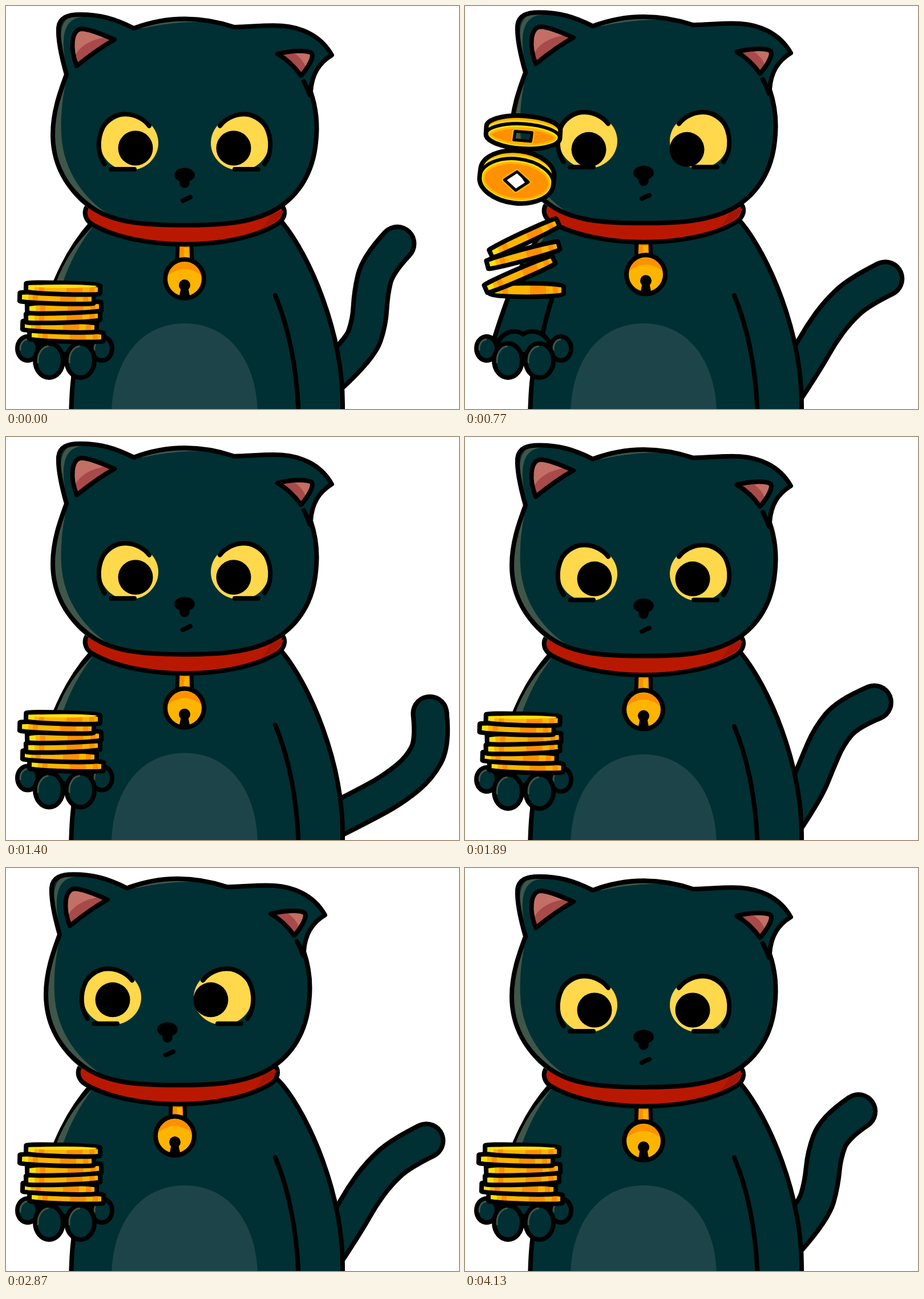
Animation of 794 by 706 pixels, one loop 4200 ms. Source, as an HTML page with a canvas:

```html
<!DOCTYPE html>
<html lang="en">
<head>
<meta charset="utf-8">
<title>Cat tossing coins</title>
<style>
html, body { margin: 0; width: 100%; height: 100%; overflow: hidden; background: #fff; }
canvas { display: block; }
</style>
</head>
<body>
<canvas id="stage" width="794" height="706"></canvas>
<script>
const c = document.getElementById('stage').getContext('2d');
const LOOP = 4200, STEP = 70, TAU = 2 * Math.PI;
const FUR = '#003033', SHINE = '#3f564a', BELLY = '#1d4549', RED = '#b91800';
const AMBER = '#ffb400', ORANGE = '#ff9000', YELLOW = '#ffdf10';
const PINK = '#c26f66', DARK_PINK = '#a84a4a';

const P = d => new Path2D(d);
const shape = {
  body: P('M165 362L150 380C110 425 85 475 52 580L60 610L120 610L118 652Q115 675 114 720H590V706C592 570 530 435 485 380L468 362Z'),
  shoulder: P('M153 386Q110 425 87 486L99 486Q118 430 153 386Z'),
  forearm: P('M152 514Q142 545 136 576'),
  arm: P('M472 507C494 560 510 630 513 720'),
  belly: P('M185 712C187 622 235 556 313 556C391 556 439 622 441 712Z'),
  collar: P('M150 346C136 350 133 372 152 383C232 429 396 429 474 383C493 372 492 350 476 346Z'),
  collarShade: P('M487 358Q480 376 448 390Q460 376 464 364Z'),
  head: P('M106 120C96 85 91 55 92 38C94 20 108 15 130 15C165 15 190 22 224 39C280 18 340 17 400 37C450 36 490 27 530 47C548 56 562 70 571 86C548 100 536 120 534 150C546 185 546 215 543 240C538 290 515 330 475 355C430 382 370 384 313 384C240 384 180 380 140 345C100 312 82 270 82 225C82 185 95 150 106 120Z'),
  headShine: P('M106 122C82 170 74 250 100 305C125 345 150 365 192 372C140 345 100 290 97 225C95 170 104 145 106 122ZM108 118C88 55 92 14 130 16C175 14 200 25 222 38C195 24 170 19 140 19C97 18 95 60 108 118ZM225 38Q300 14 375 28Q300 25 240 39Z'),
  earFold: P('M522 132Q528 143 533 157'),
  earL: P('M190 59C165 48 145 40 132 40C114 42 112 75 124 105C140 92 165 73 190 59Z'),
  earLShade: P('M118 92Q132 60 180 54L190 59L124 105Z'),
  earR: P('M476 84C500 78 525 77 535 82C542 88 528 110 517 122C505 105 492 93 476 84Z'),
  earRLight: P('M503 81Q520 92 526 108Q540 90 535 82Z'),
  eyeRim: P('M251 210C233 186 189 179 170 212C158 236 162 262 173 277'),
  eyeLid: P('M184 286H225'),
  mouth: P('M310 341L323 335'),
  palm: P('M56 610C52 575 84 562 102 575C120 562 152 575 152 610Z'),
  strap: P('M301 416H325L326 446H300Z'),
  bellBand: P('M280 475Q313 446 346 475A34 34 0 0 0 280 475Z'),
  clapper: P('M309 490H317L321 510H305Z')
};

function paint(path, fill, width = 8) {
  if (fill) { c.fillStyle = fill; c.fill(path); }
  if (width) { c.lineWidth = width; c.strokeStyle = '#000'; c.stroke(path); }
}
function oval(x, y, rx, ry, fill, width = 0) {
  const p = new Path2D();
  p.ellipse(x, y, rx, ry, 0, 0, TAU);
  paint(p, fill, width);
}
function at(x, y, draw) {
  c.save();
  c.translate(x, y);
  draw();
  c.restore();
}

const clamp = k => Math.max(0, Math.min(1, k));
// Eased step from 0 to 1 between times a and b
function ramp(t, a, b) {
  const k = clamp((t - a) / (b - a));
  return k * k * (3 - 2 * k);
}
// Rises over a..b, falls over d..e
const hold = (t, a, b, d, e) => ramp(t, a, b) - ramp(t, d, e);
const hump = (t, a, b) => Math.sin(Math.PI * clamp((t - a) / (b - a))) ** 2;
const wave = (t, period) => (1 - Math.cos(TAU * t / period)) / 2;

const TOSS_TOP = 560, TOSS_HALF = 325;

function pose(t) {
  const left = hold(t, 2300, 2700, 2950, 3400);
  const right = hold(t, 2950, 3400, 3600, 3990);
  const up = hold(t, 200, 500, 560, 770);
  const down = hold(t, 560, 770, 900, 1100);
  return {
    headX: 7 * right - 12 * left,
    headY: -4.4 * wave(t, 2100),
    faceX: -18 * left,
    faceY: -9.5 * left,
    gazeX: 9 * right - 10 * left - 12 * up - 10 * down,
    gazeY: 6 * down - 15 * up - 5 * (left + right),
    bell: 5 * right - 5 * left + 4 * down,
    bodyY: -2.5 * hump(t, 1190, 1610),
    handY: 10 * hump(t, 0, 235) + 10 * hump(t, 885, 1100) - 2.5 * hump(t, 1190, 1610),
    lift: Math.max(0, 1 - ((t - TOSS_TOP) / TOSS_HALF) ** 2),
    wobble: wave(t, 1400)
  };
}

// A chain of joints from root to tip, each swinging later than the one before
const tailSwing = [16, 23, 31, 23, 37], tailLag = [-86, -31, -2, 38, 110];

function drawTail(t) {
  const turn = TAU * t / 1050;
  let x = 565, y = 665 - 13 * Math.cos(2 * turn) + 6 * Math.sin(turn);
  const joints = [[x, y]];
  tailSwing.forEach((swing, i) => {
    const degrees = 61 - 20 * 0.5 ** i + swing * Math.cos(turn - tailLag[i] * TAU / 360);
    const angle = degrees * TAU / 360;
    const length = i ? 51 : 74 + 13 * Math.sin(turn);
    x += length * Math.cos(angle);
    y -= length * Math.sin(angle);
    joints.push([x, y]);
  });
  const p = new Path2D();
  p.moveTo(...joints[0]);
  for (let i = 1; i < 5; i++) {
    const [ax, ay] = joints[i], [bx, by] = joints[i + 1];
    const end = i === 4 ? 1 : 0.5;
    p.quadraticCurveTo(ax, ay, ax + (bx - ax) * end, ay + (by - ay) * end);
  }
  c.lineCap = 'butt';
  for (const [color, width] of [['#000', 67], [FUR, 51]]) {
    c.strokeStyle = color;
    c.lineWidth = width;
    c.stroke(p);
    oval(x, y, width / 2, width / 2, color);
  }
  c.lineCap = 'round';
}

function drawBody() {
  paint(shape.body, FUR);
  paint(shape.shoulder, SHINE, 0);
  paint(shape.belly, BELLY, 0);
  paint(shape.arm);
  paint(shape.forearm);
}

function drawBell(dx) {
  paint(shape.strap, ORANGE, 7);
  c.fillStyle = AMBER;
  c.fillRect(312, 424, 8, 18);
  at(dx, -Math.abs(dx), () => {
    oval(313, 478, 34, 34, AMBER);
    paint(shape.bellBand, ORANGE, 0);
    oval(313, 478, 34, 34, null, 8);
    oval(313, 489, 10, 10, '#000');
    paint(shape.clapper, '#000', 3);
  });
}

function drawEye(gx, gy, mirror) {
  c.save();
  if (mirror) { c.translate(626, 0); c.scale(-1, 1); }
  oval(216, 240, 51, 48, '#ffd84c');
  paint(shape.eyeRim);
  paint(shape.eyeLid);
  oval(227 + (mirror ? -gx : gx), 249 + gy, 30.5, 30.5, '#000');
  c.restore();
}

function drawHead(now) {
  paint(shape.collar, RED);
  paint(shape.collarShade, '#a31505', 0);
  paint(shape.head, FUR, 0);
  paint(shape.headShine, SHINE, 0);
  paint(shape.head);
  paint(shape.earFold);
  paint(shape.earL, PINK, 0);
  paint(shape.earLShade, DARK_PINK, 0);
  paint(shape.earL);
  paint(shape.earR, DARK_PINK, 0);
  paint(shape.earRLight, PINK, 0);
  paint(shape.earR);
  at(now.faceX, now.faceY, () => {
    drawEye(now.gazeX, now.gazeY, false);
    drawEye(now.gazeX, now.gazeY, true);
    oval(313, 296, 18, 12.5, '#000');
    oval(313, 309, 9, 10, '#000');
    paint(shape.mouth);
  });
}

function drawToe(x, y, rx, ry) {
  oval(x, y, rx, ry, FUR, 8);
  c.strokeStyle = SHINE;
  c.lineWidth = 3;
  c.beginPath();
  c.ellipse(x, y, rx - 5, ry - 5, 0, 3, 4.6);
  c.stroke();
}
function drawHand() {
  paint(shape.palm, FUR);
  for (const side of [-1, 1]) drawToe(103 + 65 * side, 600, 18, 21);
  for (const side of [-1, 1]) drawToe(103 + 27.5 * side, 621, 24.5, 30);
}

function holePath(open, y) {
  const p = new Path2D(), spin = Math.max(0, open - .32) * 2.7;
  for (let i = 0; i < 4; i++) {
    const a = spin + TAU * (i / 4 + 1 / 8);
    p.lineTo(21 * Math.cos(a), y + 21 * Math.sin(a) * (open + .18));
  }
  p.closePath();
  return p;
}

// open: 0 is edge-on, 1 is face-on
function drawCoin(x, y, tilt, open) {
  const rx = 65, ry = rx * open, h = 7, showFace = open > .14;
  const rim = new Path2D(), face = new Path2D(), ring = new Path2D();
  rim.ellipse(0, -h, rx, ry, 0, Math.PI, 0);
  rim.ellipse(0, h, rx, ry, 0, 0, Math.PI);
  rim.closePath();
  face.ellipse(0, h, rx, ry, 0, 0, TAU);
  const hole = showFace ? holePath(open, h) : new Path2D();
  ring.addPath(rim);
  ring.addPath(hole);

  c.save();
  c.translate(x, y);
  c.rotate(tilt);
  c.save();
  c.clip(ring, 'evenodd');
  c.fillStyle = AMBER;
  c.fillRect(-70, -90, 140, 180);
  for (const [left, width, color] of [[-66, 16, YELLOW], [-42, 9, ORANGE], [6, 28, ORANGE], [46, 9, ORANGE]]) {
    c.fillStyle = color;
    c.fillRect(left, -90, width, 180);
  }
  if (showFace) {
    c.fillStyle = ORANGE;
    c.fill(face);
    for (const [width, color] of [[19, AMBER], [12, YELLOW]]) {
      c.lineWidth = width;
      c.strokeStyle = color;
      c.stroke(face);
    }
    c.lineWidth = 10;
    c.strokeStyle = AMBER;
    c.stroke(hole);
  }
  c.restore();
  if (showFace) {
    paint(face, null, 6);
    paint(hole, null, 5);
  }
  paint(rim);
  c.restore();
}

// Top to bottom: x, toss height, tilt and opening gained in the air
const coins = [
  [100, 470, .05, .5],
  [89, 364, .15, .95],
  [102, 209, -.7, 0],
  [100, 186, -.4, 0],
  [94, 157, -.75, 0],
  [106, 138, -.05, .05]
];

function drawCoins({ lift, handY, wobble }) {
  for (let i = coins.length - 1; i >= 0; i--) {
    const [x, height, turn, opening] = coins[i];
    const restTilt = i % 4 < 2 ? .03 : -.03;
    drawCoin(x + 2 * wobble, 495 + 16.6 * i - height * lift + (lift ? 0 : handY),
      restTilt + turn * lift, .045 + opening * lift);
  }
  if (!lift) oval(101 + 2 * wobble, 491 + handY, 58, 3, YELLOW);
}

function draw(t) {
  const now = pose(t);
  c.fillStyle = '#fff';
  c.fillRect(0, 0, 794, 706);
  c.lineJoin = c.lineCap = 'round';
  drawTail(t);
  at(0, now.bodyY, drawBody);
  at(now.headX, now.headY, () => {
    drawBell(now.bell);
    drawHead(now);
  });
  at(0, now.handY, drawHand);
  drawCoins(now);
}

const start = performance.now();
function frame() {
  const t = (performance.now() - start) % LOOP;
  draw(Math.floor(t / STEP) * STEP);
  requestAnimationFrame(frame);
}
frame();
</script>
</body>
</html>
```
